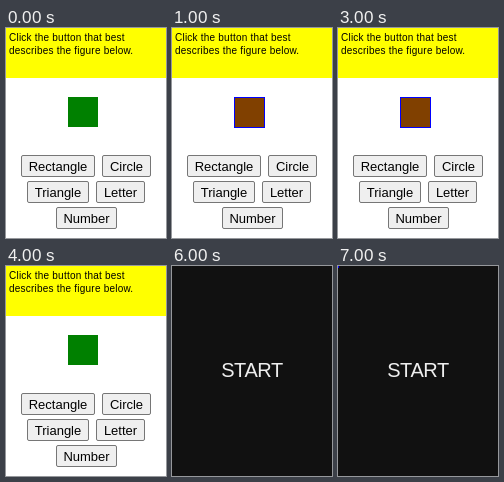
Write an HTML page that moves like this. It is 160 by 210 pixels and loops after 8000 ms.

```html
<!DOCTYPE html>
<html lang="en">
<head>
<meta charset="utf-8">
<style>
  html, body { margin: 0; width: 100%; height: 100%; overflow: hidden; background: #fff; }
  body, button { font-family: "Liberation Sans", Arial, sans-serif; }
  #stage { position: relative; width: 160px; height: 210px; overflow: hidden; }
  #stage > * { position: absolute; box-sizing: border-box; }
  #query { left: 0; top: 0; width: 160px; height: 50px; padding: 3px; background: #ff0;
    font-size: 10px; line-height: 13px; letter-spacing: .22px; }
  #square { left: 62px; top: 69px; width: 30px; height: 30px; background: #008000; }
  button { height: 22px; margin: 0; padding: 0; border: 1px solid #767676; border-radius: 2px;
    background: #efefef; color: #000; font-size: 13px; white-space: nowrap; }
  .mark { background: rgba(255, 0, 0, .5); background-clip: padding-box; border: 1px solid; }
  #look { left: 62px; top: 69px; width: 31px; height: 31px; border-color: #00f; }
  #press { left: 21px; top: 153px; width: 63px; height: 23px; border-color: #400050; }
  #cover { inset: 0; background: #111; color: #eee; font-size: 20px; line-height: 208px;
    letter-spacing: -.4px; text-align: center; }
  #corner { left: 0; top: 0; width: 1px; height: 2px; background: #00f; }
</style>
</head>
<body>
<div id="stage">
  <div id="query">Click the button that best<br>describes the figure below.</div>
  <div id="square"></div>
  <button style="left:15px;top:127px;width:74px">Rectangle</button>
  <button style="left:96px;top:127px;width:49px">Circle</button>
  <button style="left:21px;top:153px;width:62px">Triangle</button>
  <button style="left:90px;top:153px;width:49px">Letter</button>
  <button style="left:50px;top:179px;width:61px">Number</button>
  <div id="look" class="mark"></div>
  <div id="press" class="mark"></div>
  <div id="cover">START</div>
  <div id="corner"></div>
</div>
<script>
  // Seconds of the loop during which each overlay is visible
  const visibleAt = { look: [1, 3], press: [5], cover: [6, 7], corner: [7] };

  function draw() {
    const second = Math.floor(performance.now() / 1000) % 8;
    for (const id in visibleAt) {
      document.getElementById(id).hidden = !visibleAt[id].includes(second);
    }
    requestAnimationFrame(draw);
  }
  draw();
</script>
</body>
</html>
```
